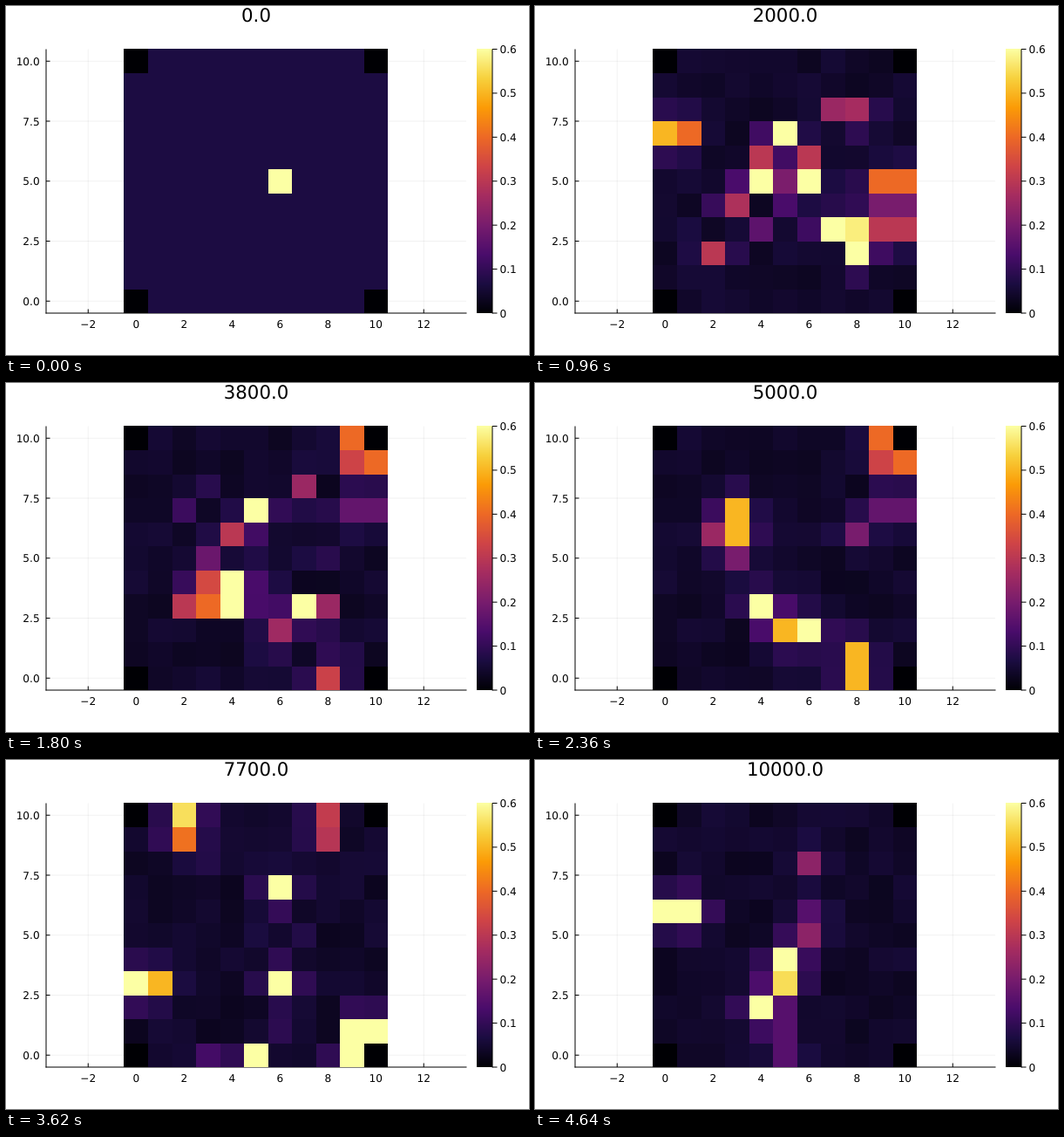
These frames come from a looping animation (600 px wide and 400 px high, 4660 ms). An HTML page:

```html
<!DOCTYPE html>
<html lang="en">
<head>
<meta charset="utf-8">
<style>
  html, body { margin: 0; width: 100%; height: 100%; overflow: hidden; background: #fff; }
  svg {
    display: block; width: 600px; height: 400px;
    font: 12.1px "DejaVu Sans", sans-serif; text-rendering: geometricPrecision;
  }
  #title { font-size: 21.3px; }
  rect { shape-rendering: crispEdges; }
</style>
</head>
<body>
<svg id="stage" viewBox="0 0 600 400"></svg>
<script>
const SIZE = 11, UNIT = 27.5, LOOP = 4660, PEAK = 0.6;
const LEFT = 46, RIGHT = 528, TOP = 49.5, BOTTOM = 352, BAR = 558;
const stage = document.getElementById('stage');

const inferno = ['000004', '1b0c41', '4a0c6b', '781c6d', 'a52c60',
  'cf4446', 'ed6925', 'fb9b06', 'f7d13d', 'fcffa4']
  .map(hex => [0, 2, 4].map(i => parseInt(hex.slice(i, i + 2), 16)));

const clamp = v => Math.min(1, Math.max(0, v));
const lerp = (a, b, mix) => a + (b - a) * mix;

function color(value) {
  const p = clamp(value / PEAK) * (inferno.length - 1);
  const i = Math.min(inferno.length - 2, Math.floor(p));
  return `rgb(${inferno[i].map((c, k) => Math.round(lerp(c, inferno[i + 1][k], p - i)))})`;
}

function add(tag, attrs, text = '') {
  const node = document.createElementNS('http://www.w3.org/2000/svg', tag);
  for (const name in attrs) node.setAttribute(name, attrs[name]);
  node.textContent = text;
  return stage.appendChild(node);
}
const line = (x1, y1, x2, y2, width = 1) =>
  add('line', { x1, y1, x2, y2, stroke: '#000', 'stroke-width': width });
const label = (x, y, anchor, text) => add('text', { x, y, 'text-anchor': anchor }, text);

function random(seed) {
  const s = Math.sin(seed * 127.1 + 3.7) * 43758.5453;
  return s - Math.floor(s);
}

// Hot cells, grouped by level and written as x * 100 + y, on a dim noisy floor.
// Each one warms its four neighbours.
const poses = [];
function pose(step, hot, floor = 0.042, noise = 0.026, glow = 0.08) {
  const heat = {};
  for (const level in hot) hot[level].forEach(cell => { heat[cell] = +level; });
  const grid = Array.from({ length: SIZE * SIZE }, (_, i) => {
    const x = i % SIZE, y = Math.floor(i / SIZE), cell = x * 100 + y;
    if (heat[cell]) return heat[cell];
    if (x % 10 === 0 && y % 10 === 0) return 0;
    const near = [cell - 100, cell + 100, cell - 1, cell + 1]
      .reduce((sum, c) => sum + (heat[c] || 0), 0);
    return floor + (random(i + step * 131) - 0.5) * noise + near * glow;
  });
  poses.push({ step, grid });
}

pose(0, { 0.6: [605] }, 0.068, 0, 0);
pose(10, { 0.6: [605, 803, 903, 1003], 0.4: [604], 0.3: [606], 0.25: [505], 0.18: [705] });
pose(28, {
  0.6: [808, 507, 405, 404, 703, 802], 0.5: [7], 0.4: [107, 304, 303, 503, 905, 1005],
  0.3: [406, 203, 202, 903, 1003], 0.25: [708, 803], 0.2: [704, 804, 904, 1004]
});
pose(50, {
  0.6: [403, 602], 0.5: [800, 801, 307, 306, 502], 0.4: [910, 1009], 0.33: [909],
  0.25: [206], 0.2: [806, 305], 0.17: [907, 1007]
});
pose(68, { 0.6: [810, 910, 909, 1009, 607, 603], 0.53: [210, 809], 0.41: [209] });
pose(86, {
  0.6: [210, 209, 408, 606, 605, 3, 501, 500, 1001, 901, 900], 0.5: [103], 0.2: [300, 301]
});
pose(100, { 0.6: [6, 106, 504, 402], 0.55: [503], 0.23: [608, 605], 0.15: [606, 502, 501, 500] });

// Axes and grid
for (let v = -2; v <= 12; v += 2) {
  const x = 149.25 + v * UNIT;
  line(x, TOP, x, BOTTOM, 0.06);
  line(x, BOTTOM - 4.5, x, BOTTOM);
  label(x, 369, 'middle', String(v).replace('-', '\u2212'));
}
for (let v = 0; v <= 10; v += 2.5) {
  const y = BOTTOM - (v + 0.5) * UNIT;
  line(LEFT, y, RIGHT, y, 0.06);
  line(LEFT, y, LEFT + 4.5, y);
  label(38.6, y + 4.5, 'end', v.toFixed(1));
}
line(LEFT - 0.5, BOTTOM, RIGHT + 0.5, BOTTOM);
line(LEFT, TOP, LEFT, BOTTOM + 0.5);

// Color bar
for (let y = 49; y < BOTTOM; y++) {
  add('rect', { x: 540, y, width: 18, height: 1, fill: color((BOTTOM - y - 0.5) / 303 * PEAK) });
}
line(BAR, TOP, BAR, BOTTOM + 0.5);
for (let i = 0; i <= 6; i++) {
  const y = lerp(BOTTOM, TOP, i / 6);
  line(BAR, y, BAR + 5.5, y);
  label(566.5, y + 4.5, 'start', i ? (i / 10).toFixed(1) : '0');
}

// Heat map, on whole pixels
const edge = i => Math.ceil(i * 303 / SIZE);
const cells = Array.from({ length: SIZE * SIZE }, (_, i) => {
  const col = i % SIZE, row = SIZE - 1 - Math.floor(i / SIZE);
  return add('rect', {
    x: 135 + edge(col), y: 49 + edge(row),
    width: edge(col + 1) - edge(col), height: edge(row + 1) - edge(row)
  });
});
const title = label(287, 18.3, 'middle', '');
title.id = 'title';

// Steps run in threes: 20, 20 and 100 ms.
function stepAt(ms) {
  const t = ms + 20;
  return 3 * Math.floor(t / 140) - 1 + Math.min(2, Math.floor(t % 140 / 20));
}

let shown = -1;
function show(step) {
  const n = Math.max(1, poses.findIndex(p => p.step >= step));
  const from = poses[n - 1], to = poses[n];
  const progress = (step - from.step) / (to.step - from.step);
  cells.forEach((cell, i) => {
    // Every cell changes over in its own short window; outer columns go first.
    const col = i % SIZE, outer = col < 2 || col > 8;
    const delay = 0.12 + random(i + n * 57) * (outer ? 0.1 : 0.66);
    cell.setAttribute('fill', color(lerp(from.grid[i], to.grid[i], clamp((progress - delay) / 0.2))));
  });
  title.textContent = (step * 100).toFixed(1);
  shown = step;
}

const start = performance.now();
function tick() {
  const step = stepAt((performance.now() - start) % LOOP);
  if (step !== shown) show(step);
  requestAnimationFrame(tick);
}
tick();
</script>
</body>
</html>
```
